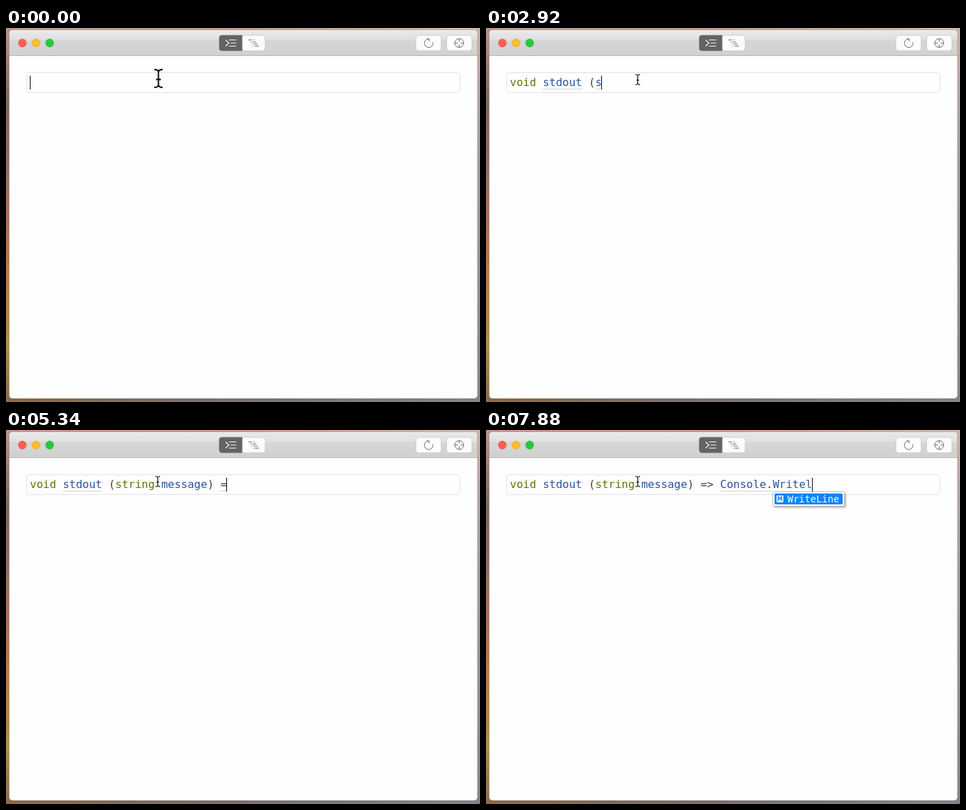
Animation of 695x548 px, one loop 8 s. Source, as an HTML page:

```html
<!DOCTYPE html>
<html lang="en">
<head>
<meta charset="utf-8">
<title>Code completion</title>
<style>
  html, body { margin: 0; width: 100%; height: 100%; overflow: hidden; background: #fefefe; }
  svg { display: block; }
  text { font-family: "DejaVu Sans Mono", monospace; white-space: pre; }
  #code { font-size: 16px; }
  .row { font-size: 14px; }
  .badge { font: bold 8px "DejaVu Sans", sans-serif; text-anchor: middle; }
  #popup { filter: drop-shadow(2px 2px 1px rgba(0, 0, 0, .28)); }
  .line { fill: none; stroke: #6b6b6b; stroke-width: 1; }
</style>
</head>
<body>
<svg width="695" height="548" viewBox="0 0 695 548">
  <defs>
    <linearGradient id="left" x2="0" y2="1">
      <stop offset="0" stop-color="#c09484"/>
      <stop offset=".2" stop-color="#86645e"/>
      <stop offset=".45" stop-color="#a66f56"/>
      <stop offset=".65" stop-color="#b87a48"/>
      <stop offset=".85" stop-color="#b5894c"/>
      <stop offset="1" stop-color="#916a44"/>
    </linearGradient>
    <linearGradient id="right" x2="0" y2="1">
      <stop offset="0" stop-color="#d3b3a6"/>
      <stop offset=".3" stop-color="#a7a0a6"/>
      <stop offset="1" stop-color="#85848c"/>
    </linearGradient>
    <linearGradient id="top">
      <stop offset="0" stop-color="#c99a88"/>
      <stop offset=".5" stop-color="#cf9a86"/>
      <stop offset="1" stop-color="#dcc0b0"/>
    </linearGradient>
    <linearGradient id="bottom">
      <stop offset="0" stop-color="#8e6a44"/>
      <stop offset=".4" stop-color="#7c706a"/>
      <stop offset="1" stop-color="#85848c"/>
    </linearGradient>
    <linearGradient id="bar" x2="0" y2="1">
      <stop offset="0" stop-color="#ebeaeb"/>
      <stop offset=".36" stop-color="#e1e0e1"/>
      <stop offset=".4" stop-color="#d8d7d8"/>
      <stop offset="1" stop-color="#d1d0d1"/>
    </linearGradient>
  </defs>

  <rect width="695" height="5" fill="url(#top)"/>
  <rect y="540" width="695" height="8" fill="url(#bottom)"/>
  <rect width="9" height="548" fill="url(#left)"/>
  <rect x="688" width="7" height="548" fill="url(#right)"/>

  <rect x="4.5" y="2.5" width="687" height="540.5" rx="5" fill="#fefefe" stroke="#000" stroke-opacity=".25"/>
  <path d="M5 40.500V8a5 5 0 0 1 5-5H686a5 5 0 0 1 5 5V40.500z" fill="url(#bar)"/>
  <path d="M5 40.500H691" stroke="#b4b4b4"/>

  <g stroke-width=".6">
    <circle cx="24" cy="22" r="5.900" fill="#ff5f57" stroke="#e2463f"/>
    <circle cx="44" cy="22" r="5.900" fill="#ffbd2e" stroke="#e1a116"/>
    <circle cx="64" cy="22" r="5.900" fill="#28c940" stroke="#12ac28"/>
  </g>

  <g fill="#fcfcfc" stroke="#c2c2c2" stroke-width=".7">
    <rect x="312.500" y="10.800" width="67.500" height="22.500" rx="4"/>
    <rect x="601" y="10.800" width="37" height="22.500" rx="4"/>
    <rect x="646" y="10.800" width="37" height="22.500" rx="4"/>
  </g>
  <path d="M346.500 10.500V33.500H316.500a4 4 0 0 1-4-4V14.500a4 4 0 0 1 4-4z" fill="#656365"/>
  <path d="M322 17.500L327 22L322 26.500M327 17.500H337.500M329.500 22H337.500M327 26.500H337.500" fill="none" stroke="#fff" stroke-width="1.100"/>
  <path class="line" d="M355.500 17.500H361M363 17.500H364.500M358 20.500H359M360.500 20.500H367M360 23.500H361M362.500 23.500H369M362 26.500H363M364.500 26.500H371"/>
  <path class="line" d="M620 16a6.300 6.300 0 1 0 6 5M616.500 16H620.500V19.500"/>
  <circle class="line" cx="664.500" cy="22" r="6.500"/>
  <path class="line" d="M664.500 15V20M664.500 24V29M657.500 22H662.500M666.500 22H671.500"/>

  <rect x="30.500" y="65.500" width="635" height="29" rx="3" fill="#fefefe" stroke="#e2e2e2"/>
  <g id="code"></g>
  <g id="popup"></g>
  <g id="pointer" fill="none">
    <path id="beam" d="M-3.500-7.500Q0-7.500 0-5Q0-7.500 3.500-7.500M0-5V5M-2 .8H2M-3.500 7.500Q0 7.500 0 5Q0 7.500 3.500 7.500" stroke="#fff" stroke-width="2.600"/>
    <use href="#beam" style="display:none"/>
    <path d="M-3.500-7.500Q0-7.500 0-5Q0-7.500 3.500-7.500M0-5V5M-2 .8H2M-3.500 7.500Q0 7.500 0 5Q0 7.500 3.500 7.500" stroke="#111" stroke-width="1.200"/>
  </g>
</svg>

<script>
const SOURCE = 'void stdout (string message) => Console.Writel';
const LEFT = 35, CHAR = 9.632, ROW = 16, LOOP = 8000;
const GREEN = '#8cc63f', BLUE = '#7db0ee', ACCENT = '#0a84ff';
const KINDS = { C: BLUE, D: BLUE, E: GREEN, S: GREEN, M: '#a98bd6', K: '#777' };
const $ = id => document.getElementById(id);

// The first letter of every item is its kind.
const list = (x, w, sel, items, top = 93, h = 0) => {
  const rows = items.split(' ');
  return { x, w, sel, rows, top, h: h || rows.length * ROW + 6 };
};
const tall = (x, w, items) => list(x, w, 18, items, 76, 294);

const POPUPS = {
  value: tall(35, 417, 'CTimeZoneInfo CTupleExtensions CType ETypeCode CTypeInitializationException ' +
    'CTypeLoadException SUInt16 Kuint SUInt32 SUInt64 SUIntPtr Kulong CUnauthorizedAccessException ' +
    'CUnhandledExceptionEventArgs DUnhandledExceptionEventHandler CUri Kushort CVersion Kvoid CWeakReference'),
  text: tall(160, 485, 'ENSWindowStyle ENSWindowTitleVisibility DNSWindowTrackEventsMatchingCompletionHandler ' +
    'DNSWindowUndoManager DNSWindowWindows CNSWorkspace CNSWorkspaceApplicationEventArgs ' +
    'CNSWorkspaceFileOperationEventArgs ENSWorkspaceIconCreationOptions ENSWorkspaceLaunchOptions ' +
    'CNSWorkspaceMountEventArgs CNSWorkspaceRenamedEventArgs DNSWorkspaceUrlHandler ENSWritingDirection ' +
    'CNSZone COperatingSystem CPlatformNotSupportedException SSByte Ksbyte CSecurityZone'),
  types: tall(205, 485, 'CAttribute EAttributeTargets CAttributeUsageAttribute CBadImageFormatException ' +
    'EBase64FormattingOptions CBitConverter Kbool SBoolean CBuffer SByte Kbyte ' +
    'CCannotUnloadAppDomainException SChar CCharEnumerator CCLSCompliantAttribute DComparison ' +
    'Kclass Kconst CConsole CConsoleCancelEventArgs'),
  console: list(343, 240, 0, 'CConsole CConsoleCancelEventArgs DConsoleCancelEventHandler EConsoleColor ' +
    'EConsoleKey SConsoleKeyInfo EConsoleModifiers EConsoleSpecialKey'),
  members: list(420, 173, 0, 'MBeep MCancelKeyPress MClear MError MIn MInputEncoding MOpenStandardError ' +
    'MOpenStandardInput MOut MOutputEncoding MRead MReadLine MSetError MWrite MWriteLine'),
  write: list(420, 106, 0, 'MWrite MWriteLine'),
  writeLine: list(420, 106, 0, 'MWriteLine')
};

// [time, characters typed, open popup]
const STEPS = [
  [0, 0], [620, 1], [690, 2, 'value'], [770, 3, 'value'], [850, 4, 'value'], [920, 5],
  [1330, 6], [1430, 7], [1620, 8], [1920, 9], [2090, 10], [2150, 11], [2330, 12], [2500, 13],
  [2920, 14], [3210, 15, 'text'], [3270, 16, 'text'], [3750, 17, 'text'], [3990, 20], [4050, 22],
  [4410, 23], [4580, 24], [4760, 25], [4850, 26], [4940, 28], [5040, 29], [5340, 30], [5580, 31],
  [5690, 32], [5930, 33], [6110, 34, 'types'], [6200, 35, 'console'], [6290, 36, 'console'],
  [6380, 37, 'console'], [6480, 38, 'console'], [6570, 39, 'console'], [6990, 40, 'members'],
  [7290, 41, 'write'], [7460, 42, 'write'], [7640, 43, 'write'], [7760, 45, 'write'], [7880, 46, 'writeLine']
];

const escape = s => s.replace(/>/g, '&gt;');
const column = n => LEFT + n * CHAR;

function color(token) {
  if (/^(void|string)$/.test(token)) return '#5a7a00';
  return /\w/.test(token) ? '#2d529c' : '#444';
}

function underlines(n) {
  const marks = [];
  if (n < 4) marks.push([0, n]);
  if (n > 5 && n < 31) marks.push([5, Math.min(11, n)]);
  if (n > 13 && n < 19) marks.push([13, n]);
  if (n === 30) marks.push([29, 30]);
  if (n > 39) marks.push([32, 40]);
  return marks;
}

function codeMarkup(n) {
  const tokens = SOURCE.slice(0, n).match(/\w+|\W/g) || [];
  const spans = tokens.map(t => `<tspan fill="${color(t)}">${escape(t)}</tspan>`).join('');
  const lines = underlines(n).map(([a, b]) => `<path d="M${column(a)} 89.5H${column(b)}" stroke="#d2d2d2"/>`).join('');
  const caret = Math.floor(column(n)) + (n ? 0 : .0);
  return `${lines}<text x="${LEFT}" y="85">${spans}</text>` +
    `<rect x="${caret}" y="70" width="1" height="20" fill="#000"/>`;
}

function iconMarkup(kind, y, selected) {
  const fill = selected ? '#fff' : KINDS[kind];
  const ink = selected ? ACCENT : '#fff';
  if (kind === 'K') return `<text class="badge" x="11" y="${y + 12}" style="font-size:11px;font-weight:400" fill="${fill}">⌘</text>`;
  const shape = kind === 'M'
    ? `<rect x="6" y="${y + 3}" width="10" height="10" rx="1" fill="${fill}"/>`
    : `<path d="M4.500 ${y + 8}l6.500-6.500 6.500 6.500-6.500 6.500z" fill="${fill}"/>`;
  return `${shape}<text class="badge" x="11" y="${y + 11}" fill="${ink}">${kind}</text>`;
}

function popupMarkup({ x, w, h, top, sel, rows }) {
  const items = rows.map((item, i) => {
    const y = top - 91 + i * ROW, on = i === sel;
    const bar = on ? `<rect x="3" y="${y}" width="${w - 6}" height="${ROW}" rx="2" fill="${ACCENT}"/>` : '';
    return `${bar}${iconMarkup(item[0], y, on)}<text class="row" x="22" y="${y + 13}" fill="${on ? '#fff' : '#000'}">${item.slice(1)}</text>`;
  }).join('');
  return `<rect x="${x + .5}" y="90.5" width="${w - 1}" height="${h - 1}" rx="2" fill="#fff" stroke="#b9b9b9"/>` +
    `<svg x="${x}" y="91" width="${w}" height="${h - 2}">${items}</svg>`;
}

let shown = -1;
function draw() {
  const t = performance.now() % LOOP;
  let i = STEPS.length - 1;
  while (STEPS[i][0] > t) i--;
  if (i !== shown) {
    const [, n, name] = STEPS[i];
    $('code').innerHTML = codeMarkup(n);
    $('popup').innerHTML = name ? popupMarkup(POPUPS[name]) : '';
    shown = i;
  }
  $('pointer').setAttribute('transform', t < 540 ? 'translate(223.5 74) scale(1.75)' : 'translate(222.5 75.500)');
  requestAnimationFrame(draw);
}
draw();
</script>
</body>
</html>
```
